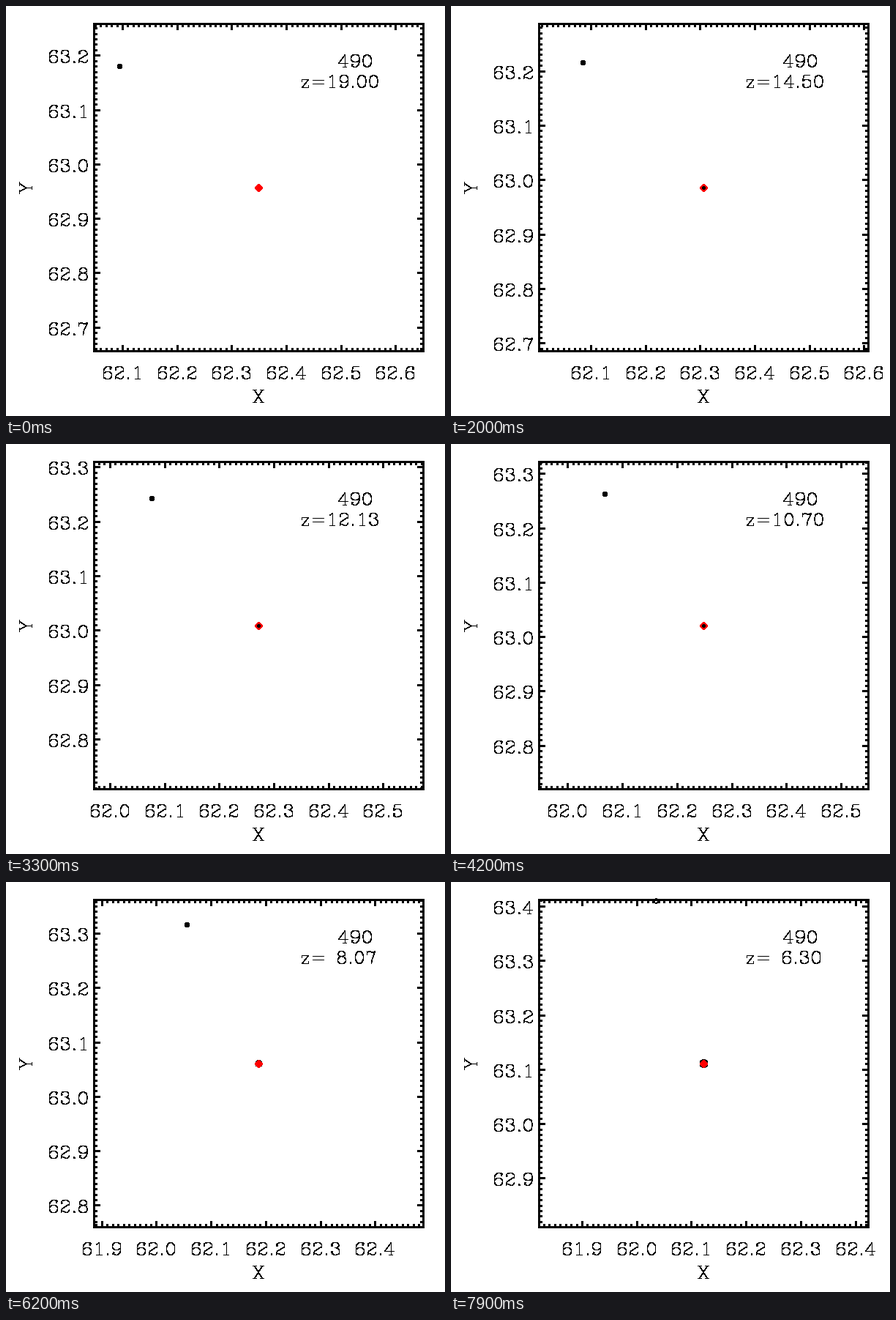
Animation, 600 px wide and 560 px high, one loop 8000 ms. Source, as a matplotlib script:

```python
import matplotlib.pyplot as plt
import numpy as np
from matplotlib.animation import FuncAnimation
from matplotlib.collections import LineCollection
from matplotlib.patches import Circle, Polygon

W, H, DPI = 600, 560, 100
PX = 72 / DPI                       # one pixel in points
FRAMES, STEP = 80, 100
LEFT, RIGHT, TOP, BOTTOM = 120, 570, 24, 471
CX, CY = 345, 247.8                 # centre of the plot in pixels
SX, SY = 747, 743                   # pixels per data unit
SCALE = 0.81                        # pixels per glyph unit


# Stroke font: y points up, baseline at 0, capitals 21 units high
def arc(cx, cy, rx, ry, a=0, b=360):
    t = np.radians(np.linspace(a, b, 8 + abs(b - a) // 24))
    return np.column_stack([cx + rx * np.cos(t), cy + ry * np.sin(t)])


def line(*xy):
    return np.reshape(xy, (-1, 2)).astype(float)


def bar(x, y, half=3):
    return line(x - half, y, x + half, y)


def ball(x, y):
    return arc(x, y, 1, 1)


def glyph(c):
    """Advance width and strokes of one character."""
    if c == "0":
        return 20, [arc(10, 10.5, 7, 10.5)]
    if c == "1":
        return 20, [line(6, 17, 11, 21, 11, 0), bar(10.5, 0, 4.5)]
    if c == "2":
        return 20, [ball(4, 16), arc(10, 15.5, 7, 5.5, 180, -30),
                    line(16, 13, 4, 6, 3, 0), line(3, 2, 6, 3, 12, 0, 16, 1, 17, 5)]
    if c == "3":
        return 20, [ball(4, 16), arc(9.5, 16.5, 6.5, 4.5, 180, -90),
                    ball(4, 5), arc(10, 6, 7, 6, 90, -170)]
    if c == "4":
        return 20, [line(13, 0, 13, 21, 2, 6, 18, 6), bar(12.5, 0)]
    if c == "5":
        return 20, [line(15, 21, 5, 21, 3, 11), ball(4, 5),
                    arc(9.5, 7, 7.5, 7, 145, -160)]
    if c == "6":
        return 20, [ball(15, 17), arc(11, 11, 8, 10, 45, 205),
                    arc(10, 6.5, 7, 6.5)]
    if c == "7":
        return 20, [line(3, 15, 3, 21),
                    line(3, 18, 7, 21, 13, 18, 17, 21, 11, 8, 10, 0)]
    if c == "8":
        return 20, [arc(10, 16.5, 6, 4.5), arc(10, 6, 7, 6)]
    if c == "9":
        return 20, [np.array([20, 21]) - s for s in glyph("6")[1]]
    if c == ".":
        return 10, [ball(5, 1), bar(5, 1, 1)]
    if c == "=":
        return 26, [bar(13, 6, 9), bar(13, 12, 9)]
    if c == "z":
        return 17, [line(2, 10, 2, 14, 13, 14, 2, 0, 13, 0, 13, 4)]
    if c == "X":
        return 20, [line(3, 21, 17, 0), line(17, 21, 3, 0)] + [
            bar(x, y) for x in (4, 16) for y in (0, 21)]
    if c == "Y":
        return 19, [line(3, 21, 10, 10, 10, 0), line(17, 21, 10, 10),
                    bar(3, 21), bar(16, 21), bar(9.5, 0)]
    return 16, []


def text(s, x, y, align=0.0, upright=True):
    """Strokes of s in pixels; align 0 is left, 0.5 centre, 1 right."""
    pen = -align * sum(glyph(c)[0] for c in s)
    out = []
    for c in s:
        width, paths = glyph(c)
        for p in paths:
            u, v = (p[:, 0] + pen) * SCALE, p[:, 1] * SCALE
            xy = (x + u, y - v) if upright else (x - v, y - u)
            out.append(np.floor(np.column_stack(xy) + 0.5) + 0.5)
        pen += width
    return out


# Motion: view centre in data units, satellite in pixels
KEYS = [0, 9, 20, 33, 51, 62, 79]
VIEW_X = [62.349, 62.3296, 62.3062, 62.2718, 62.2249, 62.1868, 62.1222]
VIEW_Y = [62.957, 62.9677, 62.9859, 63.0087, 63.0325, 63.0606, 63.1108]
MOON_X = [155, 167, 180, 199, 221, 247, 280]
MOON_Y = [82, 80, 77, 74, 62, 58, 25.5]


def redshift(i):
    """The scale factor grows by the same ratio in every step."""
    return 20 * (7.3 / 20) ** (i / (FRAMES - 1)) - 1


def ticks_along(centre, scale, mid, low, high):
    """Pixel position and value, in hundredths, of each tick in range."""
    for k in range(int(np.ceil((centre - 0.3) * 100)),
                   int((centre + 0.3) * 100) + 1):
        pos = np.floor(mid + (k / 100 - centre) * scale + 0.5) + 0.5
        if low <= pos <= high:
            yield pos, k


def axes_parts(cx, cy):
    ticks, labels = [], []
    for x, k in ticks_along(cx, SX, CX, LEFT, RIGHT):
        size = 4 if k % 10 else 8
        ticks += [[(x, BOTTOM + 1), (x, BOTTOM - size)],
                  [(x, TOP), (x, TOP + 1 + size)]]
        if k % 10 == 0:
            labels += text(f"{k / 100:.1f}", x - 1, 509, 0.5)
    for y, k in ticks_along(cy, -SY, CY, TOP, BOTTOM):
        size = 4 if k % 10 else 8
        ticks += [[(LEFT, y), (LEFT + 1 + size, y)],
                  [(RIGHT + 1, y), (RIGHT - size, y)]]
        if k % 10 == 0:
            labels += text(f"{k / 100:.1f}", 113, y + 9.5, 1)
    return ticks, labels


fig = plt.figure(figsize=(W / DPI, H / DPI), dpi=DPI, facecolor="white")
ax = fig.add_axes([0, 0, 1, 1])
ax.set(xlim=(0, W), ylim=(H, 0))
ax.axis("off")


def strokes(segments, width, **kw):
    return ax.add_collection(LineCollection(
        segments, colors="black", linewidths=width * PX, snap=False, **kw),
        autolim=False)


def thin(segments):
    return strokes(segments, 0.5, antialiaseds=False)


def disc(radius, **kw):
    return ax.add_patch(Circle((mx, my), radius, aa=False, snap=False, **kw))


l, r, t, b = LEFT + 0.5, RIGHT + 0.5, TOP + 0.5, BOTTOM + 0.5
strokes([[(l, t), (r, t)], [(l, b), (r, b)], [(l, t), (l, b)], [(r, t), (r, b)]],
        3, capstyle="projecting")
thin(text("X", 344.5, 541, 0.5) + text("Y", 35, 248, 0.5, False)
     + text("490", 452.6, 83))
tick_art = strokes([], 3, capstyle="butt")
label_art = thin([])

mx, my, d = 345.5, 248.5, 5.2
ring = disc(5, fill=False, ec="black", lw=0.6 * PX, zorder=3)
ax.add_patch(Polygon([(mx - d, my), (mx, my - d), (mx + d, my), (mx, my + d)],
                     fc="red", ec="none", aa=False, zorder=4))
core = disc(1, fc="black", ec="none", zorder=5)
moon = disc(2.8, ec="black", lw=0.6 * PX, zorder=5)


def draw(i):
    ticks, labels = axes_parts(np.interp(i, KEYS, VIEW_X),
                               np.interp(i, KEYS, VIEW_Y))
    tick_art.set_segments(ticks)
    label_art.set_segments(labels + text(f"z={redshift(i):5.2f}", 402.4, 111))

    # The halo starts as a dot on the diamond and ends as a ring around it
    wide = i >= 56
    core.set_visible(4 < i and not wide)
    core.set_radius(min(1.8, 0.7 + i / 20))
    ring.set_visible(wide)
    ring.set_radius(4 + (i - 56) / 20)
    ring.center = mx, my - 0.4

    moon.center = np.interp(i, KEYS, MOON_X) + 0.5, np.interp(i, KEYS, MOON_Y) + 0.5
    moon.set_facecolor("none" if i >= 72 else "black")
    return tick_art, label_art, core, ring, moon


anim = FuncAnimation(fig, draw, frames=FRAMES, interval=STEP, repeat=True,
                     repeat_delay=0, blit=False)
plt.show()
```
